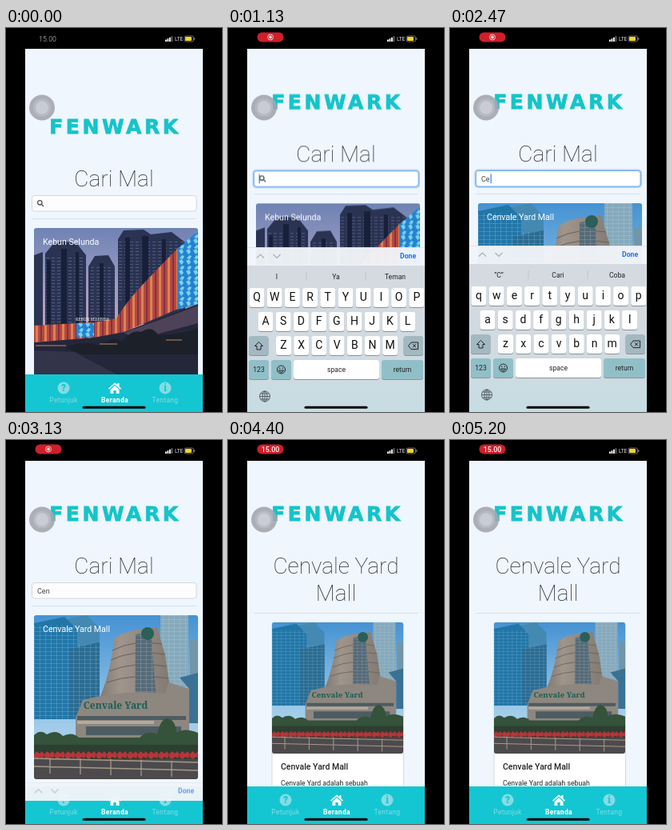
Write an HTML page that moves like this. It is 270x480 px and loops after 5.34 s.

```html
<!DOCTYPE html>
<html lang="id">
<head>
<meta charset="utf-8">
<title>Cari Mal</title>
<style>
html, body { margin: 0; width: 100%; height: 100%; overflow: hidden; background: #000; }
svg.stage { display: block; width: 100vw; height: 100vh; }
text { font-family: Roboto, "Noto Sans", sans-serif; }
.mid { text-anchor: middle; }
.brand { font: bold 25px "DejaVu Sans", sans-serif; letter-spacing: 3.6px; fill: #14c4c9; stroke: #14c4c9; stroke-width: .8px; }
.head { font-size: 28px; font-weight: 200; fill: #1f2327; }
.label { font-size: 10.6px; fill: #fff; }
.key { font-size: 14px; fill: #111; }
.fn { font-size: 8.6px; fill: #222; }
.tab { font-size: 8.5px; letter-spacing: .3px; }

/* 5340 ms loop: hard switches use step-end, slides are eased */
.a { animation: 5.34s step-end infinite; }
.ease { animation-timing-function: cubic-bezier(.2, .7, .3, 1); }
.clock { animation-name: clock; }
.pill { animation-name: pill; }
.rec { animation-name: rec; }
.pilltime { animation-name: pilltime; }
.scroll { animation-name: scroll; }
.logo { animation-name: logo; }
.home { animation-name: home; }
.first { animation-name: first; }
.found { animation-name: found; }
.next { animation-name: next; }
.focus { animation-name: focus; }
.caret { animation-name: caret; }
.l1 { animation-name: l1; }
.l2 { animation-name: l2; }
.l3 { animation-name: l3; }
.keys { animation-name: keys; }
.bar { animation-name: bar; }
.fade { animation-name: fade; animation-timing-function: linear; }
.caps { animation-name: caps; }
.s1 { animation-name: s1; }
.s2 { animation-name: s2; }
.s3 { animation-name: s3; }

@keyframes clock { 0% { opacity: 1 } 6.2%, 100% { opacity: 0 } }
@keyframes pill { 0% { opacity: 0 } 6.2%, 100% { opacity: 1 } }
@keyframes rec { 0% { opacity: 1 } 65%, 100% { opacity: 0 } }
@keyframes pilltime { 0% { opacity: 0 } 65%, 100% { opacity: 1 } }
@keyframes scroll { 0%, 17.4% { transform: none } 22.1%, 100% { transform: translateY(-31px) } }
@keyframes logo { 0% { opacity: 1 } 68.7% { opacity: 0 } 76.2%, 100% { opacity: 1 } }
@keyframes home { 0% { opacity: 1 } 68.7%, 100% { opacity: 0 } }
@keyframes first { 0% { opacity: 1 } 31.3%, 100% { opacity: 0 } }
@keyframes found { 0% { opacity: 0 } 31.3%, 100% { opacity: 1 } }
@keyframes next { 0% { opacity: 0 } 76.2%, 100% { opacity: 1 } }
@keyframes focus { 0% { opacity: 0 } 17.4% { opacity: 1 } 56.6%, 100% { opacity: 0 } }
@keyframes caret {
  0% { transform: none }
  31.3% { transform: translateX(7px) }
  39.9% { transform: translateX(12px) }
  47.4%, 100% { transform: translateX(17px) }
}
@keyframes l1 { 0% { fill-opacity: 0 } 31.3%, 100% { fill-opacity: 1 } }
@keyframes l2 { 0% { fill-opacity: 0 } 39.9%, 100% { fill-opacity: 1 } }
@keyframes l3 { 0% { fill-opacity: 0 } 47.4%, 100% { fill-opacity: 1 } }
@keyframes keys {
  0%, 17.4% { transform: translateY(210px) }
  22.1%, 56.5% { transform: none }
  58.3%, 100% { transform: translateY(210px) }
}
@keyframes bar {
  0%, 17.4% { transform: translateY(210px) }
  22.1%, 56.5% { transform: none; animation-timing-function: linear }
  58.6% { transform: translateY(154px); animation-timing-function: ease-out }
  60.6%, 100% { transform: translateY(210px) }
}
@keyframes fade { 0%, 56.5% { opacity: 1 } 58.6%, 100% { opacity: .65 } }
@keyframes caps { 0% { text-transform: uppercase } 31.3%, 100% { text-transform: none } }
@keyframes s1 { 0% { opacity: 1 } 31.3%, 100% { opacity: 0 } }
@keyframes s2 { 0% { opacity: 0 } 31.3% { opacity: 1 } 33.6%, 100% { opacity: 0 } }
@keyframes s3 { 0% { opacity: 0 } 33.6%, 100% { opacity: 1 } }
</style>
</head>
<body>
<svg class="stage" viewBox="0 0 270 480" preserveAspectRatio="none">
  <defs>
    <clipPath id="screen"><path d="M24 26H246V480H24Z"/></clipPath>
    <clipPath id="photo"><rect width="205" height="205" rx="3"/></clipPath>
    <linearGradient id="dusk" x2="0" y2="1">
      <stop stop-color="#6f83b4"/><stop offset=".35" stop-color="#9c9bc2"/><stop offset=".65" stop-color="#c3a5b4"/>
    </linearGradient>
    <linearGradient id="day" x2="0" y2="1">
      <stop stop-color="#4592d3"/><stop offset=".7" stop-color="#a3cdea"/>
    </linearGradient>
    <linearGradient id="stone">
      <stop stop-color="#6f6a66"/><stop offset=".35" stop-color="#a0958b"/><stop offset="1" stop-color="#7f7871"/>
    </linearGradient>
    <linearGradient id="deck" x2="0" y2="1">
      <stop stop-color="#d5dae1"/><stop offset=".65" stop-color="#d0dae1"/><stop offset="1" stop-color="#c5dde3"/>
    </linearGradient>
    <pattern id="led" width="11" height="60" patternUnits="userSpaceOnUse">
      <path fill="#b8473f" d="M0 0h11v60H0z"/><path fill="#d98355" d="M2 0h3v60H2z"/><path fill="#7a3542" d="M8 0h2v60H8z"/>
    </pattern>
    <pattern id="spark" width="9" height="13" patternUnits="userSpaceOnUse">
      <path fill="#2383cf" d="M0 0h9v13H0z"/><path fill="#7fd0ee" d="M1 2l4-2 2 4-3 3zM5 8l3 1-2 4-4-1z"/>
    </pattern>
    <pattern id="floors" width="7" height="4" patternUnits="userSpaceOnUse">
      <path stroke="#6c7799" stroke-opacity=".6" d="M1 1.5h4"/>
    </pattern>
    <pattern id="glass" width="7" height="5" patternUnits="userSpaceOnUse">
      <path fill="none" stroke="#bfe4f5" stroke-opacity=".28" stroke-width=".7" d="M0 .5h7M.5 0v5"/>
    </pattern>
    <pattern id="bloom" width="13" height="14" patternUnits="userSpaceOnUse">
      <path fill="#b8343b" d="M0 6l3-4 4 3 3-3 3 4-2 5-4-2-3 3-4-2z"/>
    </pattern>

    <g id="evening" clip-path="url(#photo)">
      <path fill="url(#dusk)" d="M0 0h205v205H0z"/>
      <path fill="#2a3352" d="M0 34L11 30V130H0zM14 32L24 20 36 16 54 20 65 34V140H14zM68 48L76 35 93 34 101 48V130H68zM105 14L112 3 137 2 146 8 172 5 189 18V120H105z"/>
      <path fill="url(#floors)" d="M15 34H64V120H15zM69 48H100V115H69zM106 14H188V90H106z"/>
      <path fill="#181f38" d="M16 40h5v80h-5zM34 26h7v95h-7zM52 30h4v90h-4zM82 44h5v72h-5zM114 12h6v90h-6zM135 10h8v75h-8zM160 14h5v50h-5z"/>
      <path fill="url(#led)" d="M0 122L53 119 75 118 103 113Q118 88 148 58Q163 42 180 25V101Q150 114 112 130L75 138 0 143Z"/>
      <path fill="url(#spark)" d="M179 26L205 4V95L179 102ZM53 119H75V136H53z"/>
      <path fill="#24263a" d="M0 143L75 137 112 130Q160 112 205 95V205H0Z"/>
      <path fill="#4d4258" d="M112 131Q160 114 205 97V119L130 139z"/>
      <path fill="#1b2029" d="M40 150q20-11 40-3l20-9 10 4q12-16 24-12q14-9 21 4q20 0 50-8v32H60z"/>
      <path fill="#33344a" d="M0 153L50 155 145 205H0z"/>
      <path stroke="#c08769" d="M2 147H40M82 145h22M165 140h20"/>
      <text x="73" y="116" class="mid" font-size="5" fill="#fff" style="font-family:'Noto Serif',serif">KEBUN SELUNDA</text>
    </g>

    <g id="plaza" clip-path="url(#photo)">
      <path fill="url(#day)" d="M0 0h205v205H0z"/>
      <path fill="#86a9bb" d="M158 0H193V110H158z"/>
      <path fill="#7296a8" d="M195 30H205V110H195z"/>
      <path fill="url(#glass)" d="M158 0H193V110H158z"/>
      <path fill="#4489b2" d="M36 6L66 0 82 16V130H36z"/>
      <path fill="#2176a8" d="M0 10L38 2 54 18V130H0z"/>
      <path fill="#2a6b92" d="M44 42L82 34V128H44z"/>
      <path fill="url(#glass)" d="M0 12H54V130H0zM54 36H82V128H54z"/>
      <path fill="url(#stone)" d="M70 130Q96 80 100 30Q112 18 154 15L164 50 176 130Z"/>
      <path fill="none" stroke="#66605b" d="M98 44Q125 30 160 36M96 56Q125 42 164 49M94 70Q125 57 166 64M91 84Q125 72 168 79"/>
      <path fill="#566a76" d="M127 24L146 21 153 105H126z"/>
      <path fill="url(#glass)" d="M127 24L146 21 153 105H126z"/>
      <circle cx="142" cy="23" r="8" fill="#2b5f58"/>
      <path fill="#8d8780" d="M61 106Q115 92 164 98L168 84 194 92V155H52V128z"/>
      <path fill="#4d5c62" d="M54 126H190V131H54zM65 139H184V150H65z"/>
      <path fill="#b5a99b" d="M54 132H150V136H54z"/>
      <path fill="#3b7195" d="M182 78L205 72V135H194V92z"/>
      <text x="102" y="117" class="mid" font-size="12" font-weight="700" fill="#1b5f52" style="font-family:'Noto Serif',serif">Cenvale Yard</text>
      <path fill="#35523a" d="M0 150q8-8 16-1q12-7 20 2q12-6 20 2h76q10-10 22-4q4-20 13-20q10 2 11 18q10-7 27 0V178H0z"/>
      <path fill="#2c3f30" d="M0 162H205V186H0z"/>
      <path fill="url(#bloom)" d="M0 166H205V181H0z"/>
      <path fill="#4d4a4d" d="M0 180H205V205H0z"/>
      <path fill="none" stroke="#a39a88" stroke-width="1.3" d="M0 179L205 184M0 189L205 194M20 178v20M58 179v20M96 180v20M134 181v20M172 182v20"/>
    </g>
  </defs>

  <path d="M0 0H270V480H0Z"/>
  <g clip-path="url(#screen)">
    <path fill="#eff6fe" d="M23 26H247V480H23Z"/>

    <g class="a ease scroll">
      <text class="brand mid a logo" x="136.5" y="132">FENWARK</text>
      <g class="a home">
        <text class="head mid" x="135" y="198">Cari Mal</text>
        <rect x="32.5" y="209.5" width="205.5" height="19.5" rx="3" fill="#fdfdff" stroke="#d3d7dc"/>
        <g class="a focus">
          <rect x="32" y="209" width="206.5" height="20.5" rx="3.5" fill="none" stroke="#a9cff8" stroke-width="3"/>
          <rect x="32.5" y="209.5" width="205.5" height="19.5" rx="3" fill="#fff" stroke="#6fa9e8"/>
          <path class="a caret" stroke="#3478f6" stroke-width="1.2" d="M39.2 213.5V225"/>
        </g>
        <g class="a first" fill="none" stroke="#555" stroke-width="1.3">
          <circle cx="42.3" cy="218.3" r="2.7"/><path d="M44.3 220.3L47 223"/>
        </g>
        <text x="39" y="222.5" font-size="9" fill="#444"><tspan class="a l1">C</tspan><tspan class="a l2">e</tspan><tspan class="a l3">n</tspan></text>
        <path stroke="#d9dfe6" d="M32 238.5H238"/>
        <g class="a first">
          <use href="#evening" x="35" y="250"/>
          <text class="label" x="46" y="270.5">Kebun Selunda</text>
        </g>
        <g class="a found">
          <use href="#plaza" x="35" y="250"/>
          <text class="label" x="46" y="270.5">Cenvale Yard Mall</text>
        </g>
      </g>
    </g>

    <g class="a next">
      <text class="head mid" x="135" y="167">Cenvale Yard</text>
      <text class="head mid" x="135" y="201">Mall</text>
      <path stroke="#d9dfe6" d="M32 216.5H238"/>
      <rect x="55" y="228" width="164.5" height="240" rx="3" fill="#fff" stroke="#d3d9df"/>
      <use href="#plaza" transform="translate(55 228) scale(.8)"/>
      <text x="66" y="412" font-size="10.5" font-weight="500" fill="#212529">Cenvale Yard Mall</text>
      <text x="66" y="431.5" font-size="8.7" fill="#212529">Cenvale Yard adalah sebuah</text>
    </g>

    <path fill="#14c6d2" d="M23 433H247V480H23Z"/>
    <g fill="#84dce4">
      <circle cx="72" cy="450" r="7.5"/><circle cx="199" cy="450" r="7.5"/>
      <text class="tab mid" x="72" y="468">Petunjuk</text><text class="tab mid" x="199" y="468">Tentang</text>
    </g>
    <g class="mid" fill="#14c6d2" font-weight="900">
      <text x="72" y="454.3" font-size="12">?</text><text x="199" y="454.3" font-size="12" style="font-family:'Noto Serif',serif">i</text>
    </g>
    <path fill="#fff" d="M128 450.5L136 443.3 139.3 446.2V444H141.5V448.2L144 450.5 143 451.7 136 445.4 129 451.7ZM130.5 452L136 447 141.5 452V457H137.7V453H134.3V457H130.5Z"/>
    <text class="tab mid" x="136" y="468" fill="#fff" font-weight="700">Beranda</text>

    <g opacity=".9">
      <circle cx="45" cy="99.5" r="16" fill="#a3a7b0"/>
      <circle cx="45" cy="99.5" r="11" fill="#b1b4bd"/>
      <circle cx="45" cy="99.5" r="8" fill="#c5c8d0"/>
    </g>

    <g class="a ease keys">
      <path fill="url(#deck)" d="M23 294H247V482H23Z"/>
      <path stroke="#b4bcc4" stroke-width=".7" d="M98 303V314M172 303V314"/>
      <g class="fn mid">
        <g class="a s1"><text x="61" y="312">I</text><text x="135" y="312">Ya</text><text x="209" y="312">Teman</text></g>
        <g class="a s2">
          <text x="61" y="312" opacity=".45">I</text><text x="135" y="312" opacity=".3">Yao</text>
          <text x="137" y="312">a</text><text x="209" y="312">Teman</text>
        </g>
        <g class="a s3"><text x="61" y="312">“C”</text><text x="135" y="312">Cari</text><text x="209" y="312">Coba</text></g>
      </g>
      <g id="board"></g>
      <g fill="none" stroke="#222">
        <path d="M38.5 390.5L43.5 395.5H41V400H36V395.5H33.5Z"/>
        <path d="M225.5 395.3L229 391H237.5V399.6H229ZM231 393.2L235 397.4M235 393.2L231 397.4"/>
        <circle cx="66.5" cy="425" r="5"/><path d="M63.5 426Q66.5 431 69.5 426ZM64.7 422.5v1.5M68.3 422.5v1.5"/>
        <g stroke="#4a5358" stroke-width=".9"><circle cx="46" cy="458.5" r="6.5"/><ellipse cx="46" cy="458.5" rx="3" ry="6.5"/><path d="M46 452V465M39.5 458.5H52.5M40.7 455H51.3M40.7 462H51.3"/></g>
      </g>
    </g>
    <g class="a ease bar">
      <path fill="#f1f4f8" fill-opacity=".97" d="M23 272H247V295H23Z"/>
      <path stroke="#cdd3d9" stroke-width=".6" d="M23 272.3H247"/>
      <g class="a fade">
        <path fill="none" stroke="#a9afb6" stroke-width="1.2" d="M36 285.5L40.5 281 45 285.5M56.5 281L61 285.5 65.5 281"/>
        <text x="215" y="286.3" font-size="8.7" font-weight="700" fill="#1d6ff2">Done</text>
      </g>
    </g>
    <rect x="95.5" y="472.7" width="79" height="3" rx="1.5"/>
  </g>

  <text class="mid a clock" x="52" y="16.5" font-size="8.8" fill="#8d8d8d">15.00</text>
  <g class="a pill">
    <rect x="36.5" y="5.5" width="33" height="12" rx="6" fill="#cf1f2a"/>
    <g class="a rec"><circle cx="53" cy="11.5" r="3.5" fill="none" stroke="#f3d5d7" stroke-width=".9"/><circle cx="53" cy="11.5" r="1.9" fill="#f3d5d7"/></g>
    <text class="mid a pilltime" x="53" y="14.6" font-size="8.8" font-weight="500" fill="#fff">15.00</text>
  </g>
  <path fill="#fff" d="M199 14.5h1.8V17H199zM201.5 13.2h1.8V17h-1.8zM204 11.7h1.8V17H204z"/>
  <path fill="#666" d="M206.5 10.2h1.8V17h-1.8z"/>
  <text x="211" y="16.2" font-size="6.6" fill="#ddd">LTE</text>
  <rect x="223" y="10" width="11.5" height="7" rx="2" fill="none" stroke="#888" stroke-width=".8"/>
  <rect x="224" y="11" width="8" height="5" rx="1" fill="#f5d421"/>
  <path fill="#999" d="M235.3 12.3h1v2.4h-1z"/>
</svg>
<script>
const key = (x, y, w, label, cls, fill = '#fff') => `
  <rect x="${x}" y="${y + 1}" width="${w}" height="24" rx="3.2" fill="#8b9499"/>
  <rect x="${x}" y="${y}" width="${w}" height="24" rx="3.2" fill="${fill}"/>
  <text class="mid ${cls}" x="${x + w / 2}" y="${y + (cls === 'fn' ? 15 : 16.3)}">${label}</text>`;

const rows = [['qwertyuiop', 26.5, 323], ['asdfghjkl', 37.5, 353], ['zxcvbnm', 60, 383]];
const letters = rows.map(([row, x, y]) =>
  [...row].map((c, i) => key(x + i * 22.2, y, 19, c, 'key a caps')).join('')).join('');

const others = [
  [26, 383, 24.5, '', '#a3b9c2'],
  [219.5, 383, 24.5, '', '#a3b9c2'],
  [26, 413, 25, '123', '#91bfc8'],
  [54, 413, 25, '', '#91bfc8'],
  [82, 413, 107, 'space', '#fff'],
  [192, 413, 52, 'return', '#91bfc8']
].map(([x, y, w, label, fill]) => key(x, y, w, label, 'fn', fill)).join('');

document.getElementById('board').innerHTML = letters + others;
</script>
</body>
</html>
```
